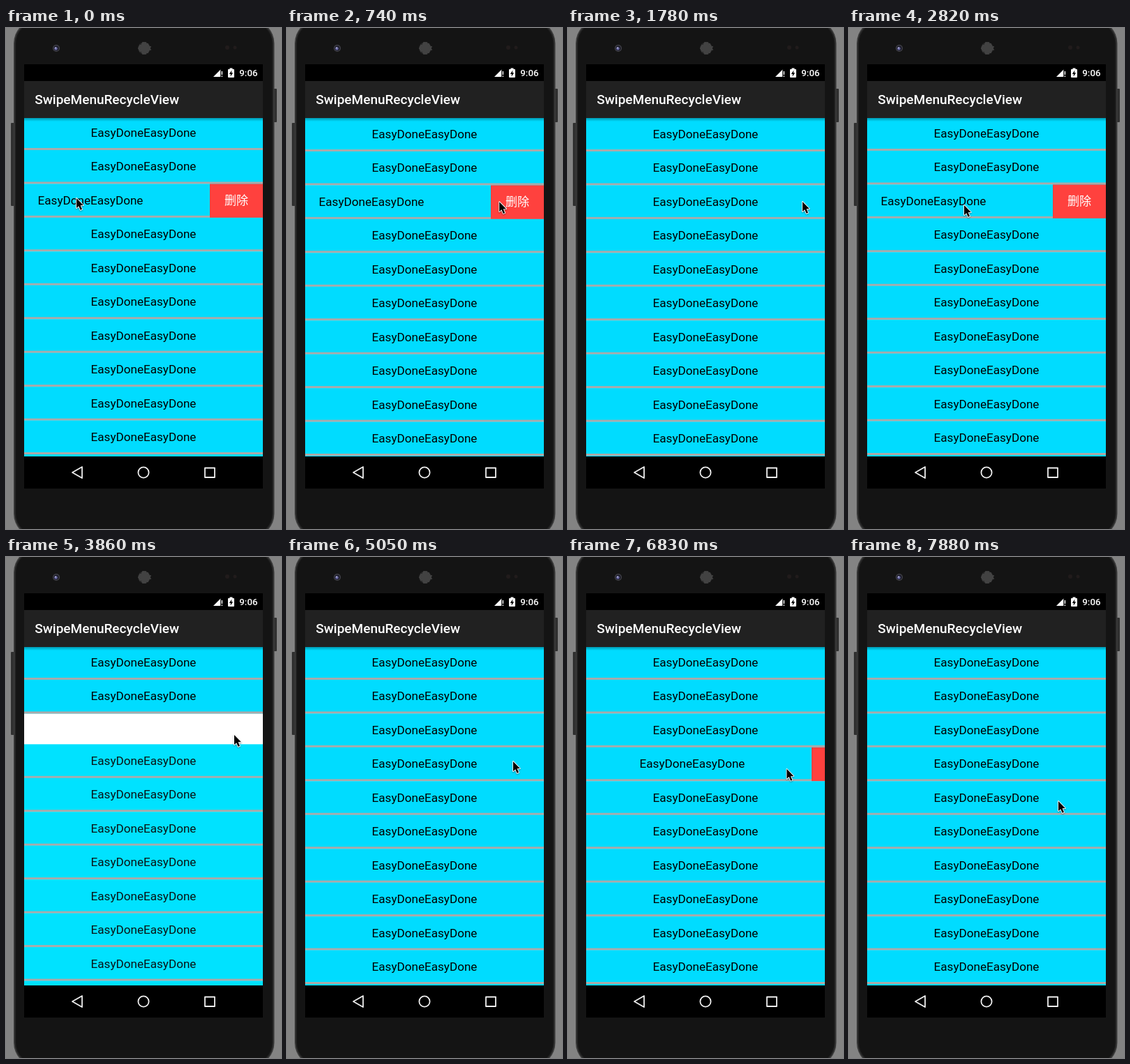
Animation, 394 px wide and 718 px high, one loop 8000 ms. Source, as an HTML page with a canvas:

```html
<!DOCTYPE html>
<html lang="en">
<head>
<meta charset="utf-8">
<title>Swipe menu list</title>
<style>
  html, body { margin: 0; width: 100%; height: 100%; overflow: hidden; background: #838383; }
  canvas { display: block; width: 394px; height: 718px; }
</style>
</head>
<body>
<canvas id="stage" width="394" height="718"></canvas>
<script>
const ctx = document.getElementById('stage').getContext('2d');
const LOOP = 8000, STEP = 148.5;
const LEFT = 26, WIDTH = 342, TOP = 129, BOTTOM = 614;
const PITCH = 48.45, DIVIDER = 3, MENU = 76;

// Removing a row: it fades for 120 ms, then the rows below close up for 250 ms.
const FADE = 120 / STEP, SLIDE = 250 / STEP;
const removals = [9.2, 24.86];

// Pointer gestures, timed in steps.
const startPoint = { x: 101, y: 243 };
const gestures = [
  { from: 0, to: 1, x: 82, y: 249 },
  { from: 2, to: 8, x: 336, y: 248 },
  { from: 15, to: 19, x: 165, y: 253 },
  { from: 20, to: 23, x: 327, y: 254 },
  { from: 30, to: 34, x: 324, y: 292 },
  { from: 34, to: 38, x: 127, y: 299 },
  { from: 38, to: 41, x: 325, y: 299 },
  { from: 44, to: 47, x: 313, y: 303 },
  { from: 49, to: 51, x: 283, y: 363 },
  { from: 51, to: 53, x: 300, y: 349 }
];

const ramp = (t, from, to) => Math.min(1, Math.max(0, (t - from) / (to - from)));
const easeOut = p => 1 - (1 - p) ** 3;
const easeInOut = p => (1 - Math.cos(Math.PI * p)) / 2;

function pointer(step) {
  return gestures.reduce((at, g) => {
    const p = easeOut(ramp(step, g.from, g.to));
    return { x: at.x + (g.x - at.x) * p, y: at.y + (g.y - at.y) * p };
  }, startPoint);
}

function removal(step) {
  const at = removals.find(t => step >= t && step < t + FADE + SLIDE);
  if (at === undefined) return { alpha: 1, shift: 0 };
  return {
    alpha: 1 - ramp(step, at, at + FADE),
    shift: PITCH * easeInOut(ramp(step, at + FADE, at + FADE + SLIDE))
  };
}

function swipe(row, step) {
  const gone = removals.filter(t => step >= t + FADE + SLIDE).length;
  if (row === 2 && gone < 2) return gone ? MENU * ramp(step, 16, 18) : MENU;
  if (row === 3) return MENU * (easeOut(ramp(step, 34, 36)) - easeInOut(ramp(step, 44, 47)));
  return 0;
}

function rect(color, x, y, w, h) {
  ctx.fillStyle = color;
  ctx.fillRect(x, y, w, h);
}

function disc(color, x, y, r) {
  ctx.fillStyle = color;
  ctx.beginPath();
  ctx.arc(x, y, r, 0, Math.PI * 2);
  ctx.fill();
}

function rounded(color, x, y, w, h, r) {
  ctx.fillStyle = color;
  ctx.beginPath();
  ctx.roundRect(x, y, w, h, r);
  ctx.fill();
}

function poly(...points) {
  ctx.beginPath();
  points.forEach(([x, y]) => ctx.lineTo(x, y));
  ctx.closePath();
}

function label(text, font, color, x, y, align) {
  ctx.font = font;
  ctx.fillStyle = color;
  ctx.textAlign = align;
  ctx.fillText(text, x, Math.round(y));
}

function drawDevice() {
  rect('#838383', 0, 0, 394, 718);
  rounded('#303030', 7, 136, 6, 119, 1);
  rounded('#303030', 382, 87, 6, 48, 1);
  ['#3c3c3c', '#222', '#141414'].forEach((color, i) => {
    const inset = i * 1.6;
    rounded(color, 11 + inset, -12 + inset, 373.5 - 2 * inset, 742 - 2 * inset, 34 - inset);
  });

  disc('#45454c', 72, 29, 5);
  disc('#1c1c28', 72, 29, 3.8);
  disc('#6464a0', 71.5, 29.5, 2.3);
  disc('#c0c0dc', 71, 28.5, 1);

  disc('#292929', 198, 29, 9);
  for (let y = -8; y <= 8; y += 2)
    for (let x = -8; x <= 8; x += 2)
      if (x * x + y * y < 72) disc('#6a6a6a', 198 + x + (y / 2 & 1), 29 + y, 0.75);

  disc('#211c1c', 317, 28, 3);
  disc('#211c1c', 328, 28, 2.5);
}

function drawStatusIcons() {
  ctx.fillStyle = '#fff';
  poly([297, 70], [308, 59], [308, 70]);
  ctx.fill();
  rect('#000', 307.3, 58, 4, 13);
  rect('#fff', 308.7, 62, 1.4, 5);
  rect('#fff', 308.7, 68.5, 1.4, 1.5);
  rect('#fff', 320.5, 57.5, 4, 2);
  rounded('#fff', 318, 59, 9, 12, 1);
  ctx.fillStyle = '#000';
  poly([323.5, 60.5], [319.8, 66], [322, 66], [321.5, 69.8], [325.2, 64.3], [323, 64.3]);
  ctx.fill();
}

function drawBars() {
  rect('#000', LEFT, 52, WIDTH, 24);
  rect('#212121', LEFT, 76, WIDTH, TOP - 76);
  label('SwipeMenuRecycleView', '500 19px Roboto, sans-serif', '#fff', 41.2, 109, 'left');
  label('9:06', '500 13.3px Roboto, sans-serif', '#fff', 360.5, 69, 'right');
  drawStatusIcons();

  rect('#000', LEFT, BOTTOM, WIDTH, 46);
  ctx.strokeStyle = '#eee';
  ctx.lineWidth = 1.8;
  ctx.lineJoin = 'round';
  poly([95, 637], [109, 629], [109, 645]);
  ctx.stroke();
  ctx.beginPath();
  ctx.arc(197, 637, 7.6, 0, Math.PI * 2);
  ctx.stroke();
  ctx.strokeRect(285, 630.5, 14, 13.5);
}

function drawRow(y, open, moving) {
  const baseline = y + 29.5;
  rect(moving ? '#00e2ff' : '#00dcff', LEFT, y, WIDTH, PITCH);
  rect('#aaa', LEFT, y + PITCH - DIVIDER, WIDTH, DIVIDER);
  label('EasyDoneEasyDone', '17.1px Roboto, sans-serif', moving ? '#0a1416' : '#000',
    LEFT + WIDTH / 2 - open, baseline, 'center');
  if (open > 0) {
    const x = LEFT + WIDTH - open;
    rect('#ff413e', x, y, MENU, PITCH);
    label('删除', '17.1px "Noto Sans CJK SC", "Noto Sans CJK", sans-serif', '#fff',
      x + MENU / 2, baseline, 'center');
  }
}

function drawList(step) {
  const scroll = 126.5 + (step >= 1 ? 2 : 0) - (step >= 17 ? 1 : 0);
  const { alpha, shift } = removal(step);
  ctx.save();
  ctx.beginPath();
  ctx.rect(LEFT, TOP, WIDTH, BOTTOM - TOP);
  ctx.clip();
  rect('#fff', LEFT, TOP, WIDTH, BOTTOM - TOP);
  for (let i = 0; i < 12; i++) {
    const offset = i > 2 ? shift : 0;
    ctx.globalAlpha = i === 2 ? alpha : 1;
    drawRow(scroll + i * PITCH - offset, swipe(i, step), offset > 0);
  }
  ctx.globalAlpha = 1;
  const shadow = ctx.createLinearGradient(0, TOP, 0, TOP + 5);
  shadow.addColorStop(0, 'rgba(0,0,0,0.3)');
  shadow.addColorStop(1, 'rgba(0,0,0,0)');
  rect(shadow, LEFT, TOP, WIDTH, 5);
  ctx.restore();
}

function drawCursor(step) {
  const { x, y } = pointer(step);
  ctx.save();
  ctx.translate(x, y + 1);
  poly([0, 0], [0, 14], [3.2, 11.2], [5.6, 16.8], [8, 15.8], [5.6, 10.3], [9.8, 10.1]);
  ctx.shadowColor = 'rgba(0,0,0,0.4)';
  ctx.shadowBlur = 2;
  ctx.shadowOffsetY = 1;
  ctx.strokeStyle = '#fff';
  ctx.lineWidth = 1.8;
  ctx.stroke();
  ctx.shadowColor = 'transparent';
  ctx.fillStyle = '#000';
  ctx.fill();
  ctx.restore();
}

function draw(now) {
  // The picture advances in even, hard steps.
  const step = Math.floor((now % LOOP + 5) / STEP);
  drawDevice();
  drawList(step);
  drawBars();
  drawCursor(step);
}

const start = performance.now();
function tick() {
  draw(performance.now() - start);
  requestAnimationFrame(tick);
}
tick();
</script>
</body>
</html>
```
